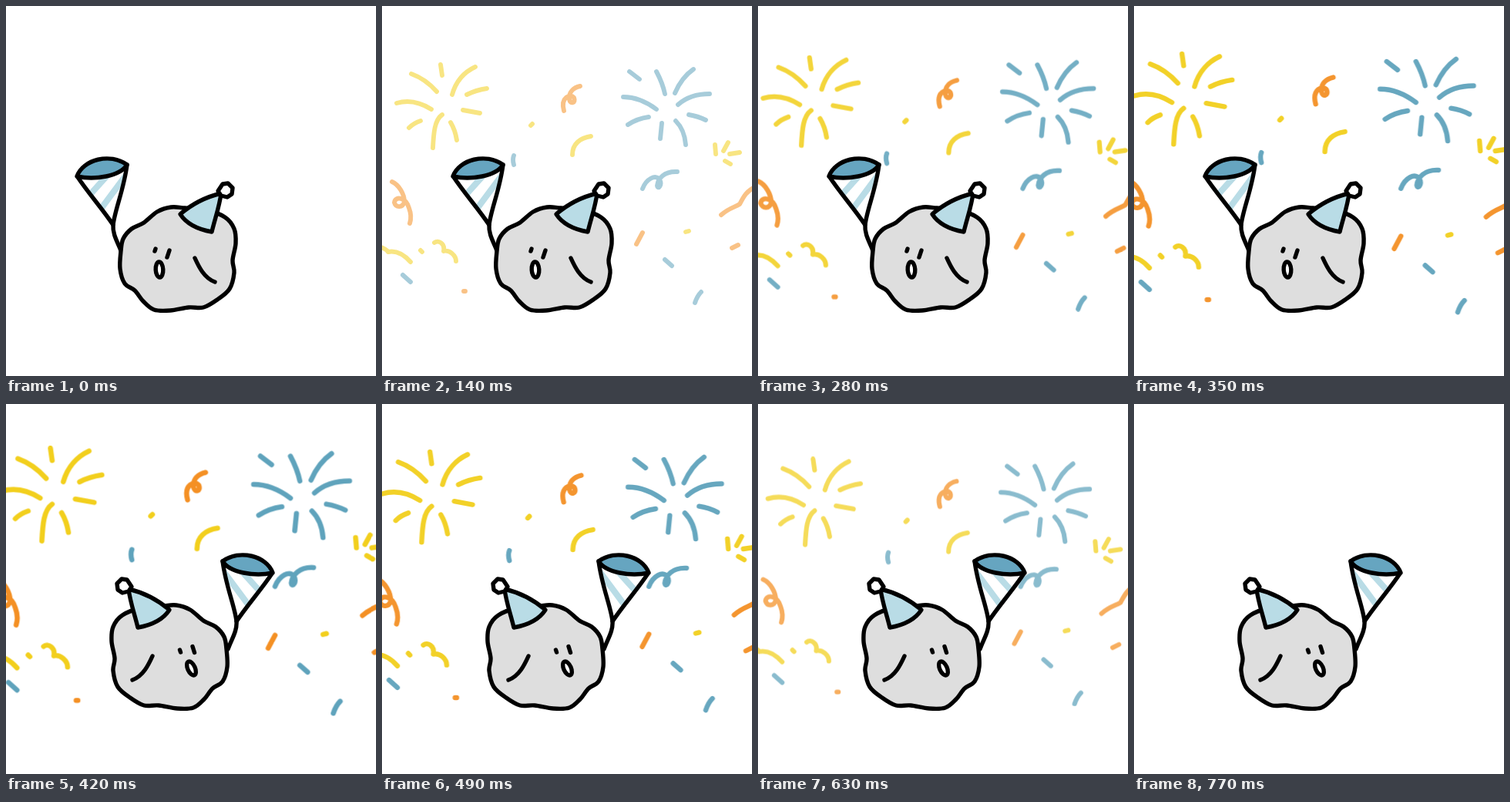
An HTML page for the animation above (840 ms loop, 480 by 480 pixels).

```html
<!DOCTYPE html>
<html lang="en">
<head>
<meta charset="utf-8">
<title>Party pebble</title>
<style>
  html, body { margin: 0; width: 100%; height: 100%; overflow: hidden; background: #fff; }
  svg { display: block; width: 100vw; height: 100vh; }
  path, ellipse { stroke-linecap: round; stroke-linejoin: round; }
  .ink { stroke: #000; stroke-width: 5.4; fill: none; }
  #confetti { fill: none; stroke-width: 5.9; transform-origin: 240px 240px; }
</style>
</head>
<body>
<svg viewBox="0 0 480 480">
  <defs>
    <clipPath id="coneClip"><path d="M92 221L139 284C141 265 153 238 157 206Z"/></clipPath>
    <g id="cone">
      <path class="ink" d="M139 284C138 297 146 308 150 320"/>
      <path d="M92 221L139 284C141 265 153 238 157 206Z" fill="#fff"/>
      <path d="M106 248L134 217M121 266L156 219" clip-path="url(#coneClip)" fill="none" stroke="#b9dce6" stroke-width="8"/>
      <path class="ink" d="M93 222C107 243 125 263 139 284C141 265 153 238 157 206"/>
      <path class="ink" d="M92 221C100 199 135 190 157 206C148 221 115 226 92 221Z" style="fill:#66a5c0"/>
    </g>
    <g id="body">
      <path id="outline" class="ink" style="fill:#dedede"/>
      <path class="ink" d="M245 327C250 338 257 353 271 358"/>
    </g>
    <g id="hat">
      <path class="ink" d="M226 270C240 258 258 248 279 243C277 260 271 276 267 293C250 290 235 284 226 270Z" style="fill:#b9dce6"/>
      <path class="ink" d="M281 231L288 230L294 236L293 244L287 248L279 246L275 240Z" style="fill:#fff"/>
    </g>
  </defs>

  <g id="confetti"></g>

  <g id="facingLeft">
    <use href="#cone"/>
    <use href="#body"/>
    <use href="#hat"/>
    <path class="ink" d="M194 315L193 318M212 317L209 326"/>
    <ellipse class="ink" cx="199" cy="342" rx="4.8" ry="10" transform="rotate(-3 199 342)" style="fill:#fff"/>
  </g>
  <g id="facingRight">
    <use href="#cone" transform="translate(438 -2) scale(-1 1)"/>
    <use href="#body" transform="translate(435 0) scale(-1 1)"/>
    <use href="#hat" transform="translate(438 -3) scale(-1 1)"/>
    <path class="ink" d="M225.500 319L226.500 322M242 314.500L244.500 322.500"/>
    <ellipse class="ink" cx="240.500" cy="343" rx="4.800" ry="9.500" transform="rotate(-24 240.500 343)" style="fill:#fff"/>
  </g>
</svg>
<script>
const $ = id => document.getElementById(id);
const STEPS = 12, LOOP = 840;

// Smooth closed curve through the given points
function blob(pts) {
  const at = i => pts[(i + pts.length) % pts.length];
  let d = `M${at(0)}`;
  pts.forEach((p, i) => {
    const a = at(i - 1), q = at(i + 1), b = at(i + 2);
    const c1 = p.map((v, k) => v + (q[k] - a[k]) / 6);
    const c2 = q.map((v, k) => v - (b[k] - p[k]) / 6);
    d += `C${c1} ${c2} ${q}`;
  });
  return d + 'Z';
}

$('outline').setAttribute('d', blob([
  [149, 318], [152, 302], [163, 289], [179, 281], [196, 267], [214, 261],
  [232, 262], [258, 264], [284, 274], [296, 289], [298, 308], [294, 330],
  [296, 346], [290, 367], [274, 381], [256, 391], [237, 391], [213, 395],
  [192, 394], [178, 383], [167, 369], [154, 360], [148, 341]
]));

const strokes = {
  '#f2cf1d': [
    'M76 76L78 90M121 79C108 85 96 97 91 115M38 88C52 93 63 102 71 111',
    'M136 107Q122 109 110 115M19 126C36 121 50 125 64 134M105 135L127 139',
    'M50 149Q41 152 35 158M78 141C68 148 67 165 66 184M89 151Q95 161 97 174',
    'M193 155L195 153M271 169C257 171 247 179 247 193',
    'M432 180L433 192M449 177L443 188M464 190L451 192M445 201L452 205',
    'M394 293L398 292M50 317L52 319',
    'M-4 312C2 314 6 316 8 319C18 317 28 322 37 332',
    'M68 307C73 303 82 308 80 318C88 316 96 324 96 331'
  ],
  '#5fa3bc': [
    'M321 85L334 95M356 85Q364 100 367 114M404 82C394 89 386 99 380 113',
    'M313 118C330 118 344 125 356 134M425 114C406 114 394 119 384 128',
    'M346 144Q331 146 319 154M363 152L361 172',
    'M381 149C388 156 393 167 394 180M398 141Q410 143 420 148',
    'M171 194Q169 199 171 206M367 329L376 337M414 371Q409 376 406 385M27 349L37 358',
    'M338 237C343 224 355 218 360 225C364 232 358 239 357 233C358 224 366 214 383 215'
  ],
  '#f49024': [
    'M257 104C248 106 242 112 243 121C244 128 252 126 249 119C245 113 231 118 236 136',
    'M13 228C22 232 29 244 29 254C27 262 18 262 16 255C17 246 31 248 35 262C38 270 38 276 36 282',
    'M484 235C472 240 468 250 464 257C458 261 450 262 440 271',
    'M338 294L330 309M454 314L462 310M106 370L108 370'
  ]
};
$('confetti').innerHTML = Object.entries(strokes)
  .map(([color, d]) => `<path stroke="${color}" d="${d.join('')}"/>`).join('');

// Holds each value for its share of the loop, then jumps
function play(id, frames) {
  const n = frames.length;
  const held = frames.map((f, i) => ({ ...f, offset: i / n, easing: 'step-end' }));
  held.push({ ...frames[n - 1], offset: 1 });
  $(id).animate(held, { duration: LOOP, iterations: Infinity }).startTime = 0;
}

const alpha = [0, .3, .55, .73, .87, .95, 1, .95, .87, .73, .55, 0];
play('confetti', alpha.map((opacity, i) => ({
  opacity,
  transform: `scale(${1.112 - .028 * Math.abs(i - STEPS / 2)})`
})));
play('facingLeft', [{ opacity: 1 }, { opacity: 0 }]);
play('facingRight', [{ opacity: 0 }, { opacity: 1 }]);
</script>
</body>
</html>
```
